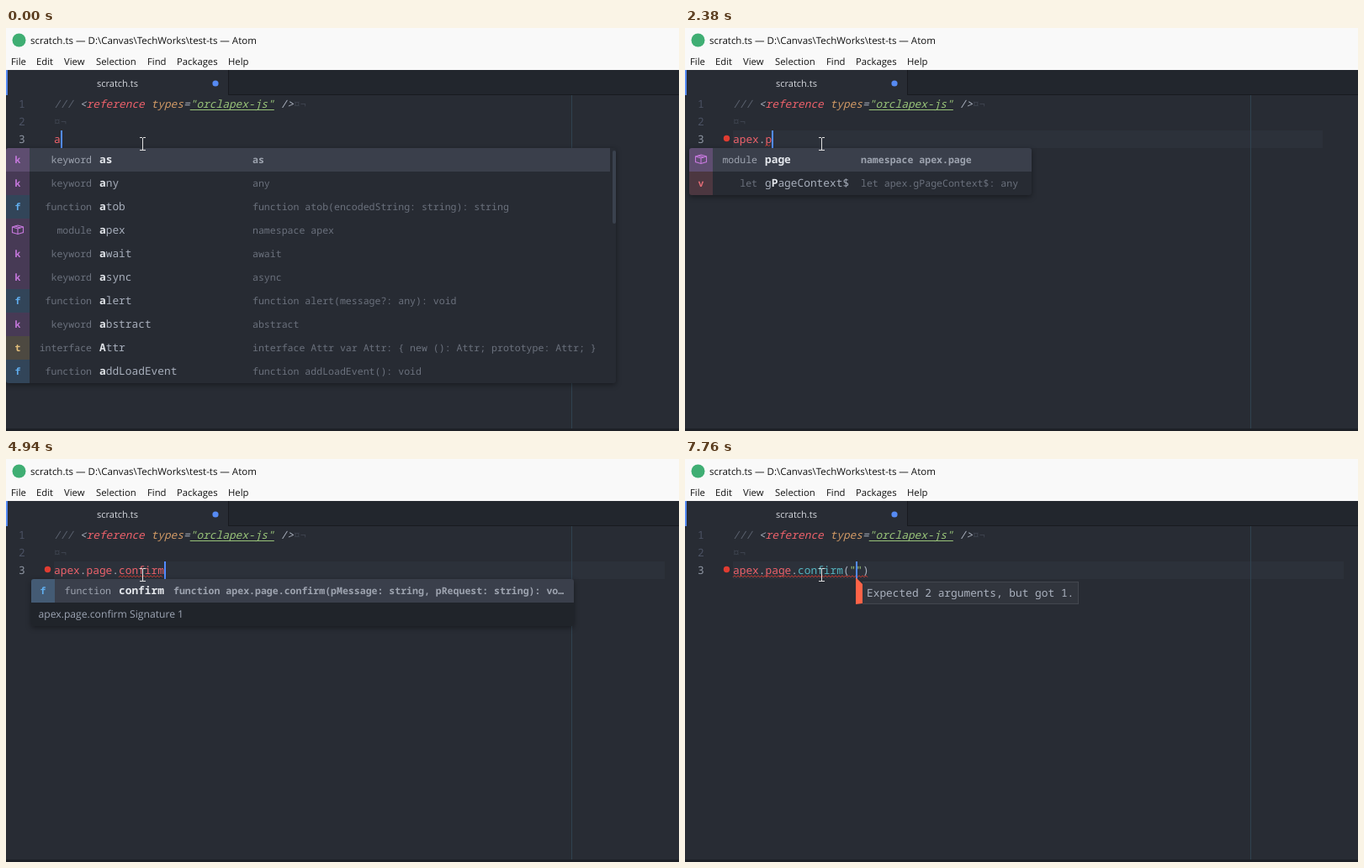
An HTML page with a canvas for the animation above (8 s loop, 800 by 480 pixels).

```html
<!DOCTYPE html>
<html lang="en">
<head>
<meta charset="utf-8">
<title>Editor completion</title>
<style>
html, body { margin: 0; width: 100%; height: 100%; overflow: hidden; background: #282c34; }
canvas { display: block; }
</style>
</head>
<body>
<canvas id="stage" width="800" height="480"></canvas>
<script>
const ctx = document.getElementById('stage').getContext('2d');
ctx.textRendering = 'geometricPrecision';

const LOOP = 8000, CHAR = 7.7, LEFT = 57, ROW = 28, TOP = 143;
const MONO = '"Noto Sans Mono", "DejaVu Sans Mono", monospace';
const UI = '"Open Sans", "Noto Sans", sans-serif';
const CODE = 12.83, SMALL = 11.55;
const RED = '#ee626b', GREY = '#abb2bf', DIM = '#6b717d', GREEN = '#98c379',
      BLUE = '#568af2', CYAN = '#56b6c2', ORANGE = '#d19a66', FAINT = '#3f4550';

const kinds = {
  keyword: { glyph: 'k', color: '#c678dd' },
  function: { glyph: 'f', color: '#61afef' },
  module: { glyph: 'box', color: '#c678dd' },
  interface: { glyph: 't', color: '#e5c07b' },
  let: { glyph: 'v', color: '#e06c75' },
  '': { glyph: 'arrow', color: '#98c379' }
};

// Suggestion rows
const item = (type, name, detail = name) => ({ type, name, detail });
const keyword = name => item('keyword', name);
const space = (name, scope = '') => item('module', name, `namespace ${scope}${name}`);
const variable = (name, type) => item('let', name, `let apex.${name}: ${type}`);
const method = (scope, name, params = '', result = 'void') =>
  item('function', name, `function ${scope}${name}(${params}): ${result}`);
const member = (...names) => names.map(name => space(name, 'apex.'));

const message = 'pMessage: string';
const request = `${message}, pRequest: string`;
const context = variable('gPageContext$', 'any');
const pageConfirm = method('apex.page.', 'confirm', request);
const isChanged = method('apex.page.', 'isChanged', '', 'boolean');
const warnUnsaved = method('apex.page.', 'warnOnUnsavedChanges', `${message}, pExtraIsChanged: any`);
const confirmDoc = 'apex.page.confirm Signature 1';

const popups = {
  a: { left: 0, right: 725, rowRight: 718, nameX: 111, detailX: 293, thumb: 87, rows: [
    keyword('as'), keyword('any'),
    method('', 'atob', 'encodedString: string', 'string'),
    space('apex'), keyword('await'), keyword('async'),
    method('', 'alert', 'message?: any'), keyword('abstract'),
    item('interface', 'Attr', 'interface Attr var Attr: { new (): Attr; prototype: Attr; }'),
    method('', 'addLoadEvent')] },
  apex: { left: 0, right: 260, nameX: 90, detailX: 136, rows: [space('apex')] },
  members: { left: 0, right: 702, rowRight: 692, nameX: 104, detailX: 216, thumb: 169, rows: [
    variable('JQuery', 'JQuery<HTMLElement>'),
    method('apex.', 'confirm', request, 'void (+1 overload)'),
    ...member('da', 'debug', 'event'), context,
    item('function', 'item', 'namespace apex.item function apex.item(pNd: string | HTMLElement): item'),
    ...member('lang', 'message', 'navigation')] },
  page: { left: 5, right: 412, nameX: 95, detailX: 209, rows: [space('page', 'apex.'), context] },
  pageMembers: { left: 31, right: 776, nameX: 134, detailX: 346, limit: 60, rows: [
    method('apex.page.', 'cancelWarnOnUnsavedChanges'), pageConfirm, isChanged,
    method('apex.page.', 'submit', 'pOptions: string'),
    method('apex.page.', 'validate', '', 'boolean'), warnUnsaved] },
  c: { left: 31, right: 776, nameX: 134, detailX: 300, doc: confirmDoc,
    rows: [pageConfirm, isChanged, warnUnsaved, item('', 'combak')] },
  confirm: { left: 30, right: 675, nameX: 134, detailX: 199, doc: confirmDoc, rows: [pageConfirm] }
};

// Each step changes part of the state; wavy is the column where the error underline starts.
const typing = (start, pause, before, word) =>
  [...word].map((_, i) => [start + i * pause, { text: before + word.slice(0, i + 1) }]);

const steps = [
  [0, { text: 'a', caret: true, popup: 'a', dot: false, wavy: -1, tip: null, lineEnd: LEFT }],
  [120, { text: 'ap', lineEnd: 758 }],
  [260, { popup: 'apex' }],
  ...typing(540, 275, 'ap', 'ex'),
  [1090, { text: 'apex.', popup: null }],
  [1240, { popup: 'members' }],
  [1520, { caret: false }],
  [1790, { caret: true }],
  [2220, { text: 'apex.p' }],
  [2380, { popup: 'page', dot: true, wavy: 5 }],
  ...typing(2530, 140, 'apex.p', 'age'),
  [3000, { text: 'apex.page.', popup: null, wavy: -1 }],
  [3230, { popup: 'pageMembers', lineEnd: 783 }],
  [3360, { dot: false }],
  [3500, { caret: false }],
  [3660, { caret: true }],
  [3970, { popup: 'c', dot: true, wavy: 10 }],
  ...typing(3970, 140, 'apex.page.', 'confirm'),
  [4250, { popup: 'confirm' }],
  [5190, { popup: null }],
  [5320, { text: 'apex.page.confirm()' }],
  [5450, { dot: false, wavy: -1 }],
  [5730, { caret: false }],
  [6010, { dot: true, wavy: 0, tip: { col: 18, got: 0 } }],
  [6150, { caret: true }],
  [6580, { caret: false }],
  [6860, { text: 'apex.page.confirm("")', caret: true }],
  [7020, { tip: { col: 19, got: 0 } }],
  [7320, { caret: false }],
  [7630, { caret: true }],
  [7760, { tip: { col: 19, got: 1 } }]
];

const stateAt = t => Object.assign({}, ...steps.filter(([start]) => start <= t).map(([, change]) => change));
const columnX = col => LEFT + col * CHAR;
const shorten = (text, limit) => text.length > limit ? text.slice(0, limit) + '…' : text;

function rect(x, y, w, h, color) {
  ctx.fillStyle = color;
  ctx.fillRect(x, y, w, h);
}

function roundRect(x, y, w, h, r, color) {
  ctx.fillStyle = color;
  ctx.beginPath();
  ctx.roundRect(x, y, w, h, r);
  ctx.fill();
}

function disc(x, y, r, color) {
  ctx.fillStyle = color;
  ctx.beginPath();
  ctx.arc(x, y, r, 0, 7);
  ctx.fill();
}

function polygon(points, color) {
  ctx.fillStyle = color;
  ctx.beginPath();
  points.forEach(([x, y]) => ctx.lineTo(x, y));
  ctx.fill();
}

function polyline(points, color, width = 1) {
  ctx.strokeStyle = color;
  ctx.lineWidth = width;
  ctx.beginPath();
  points.forEach(([x, y]) => ctx.lineTo(x, y));
  ctx.stroke();
}

function label(text, x, y, color, size, family = MONO, style = '', align = 'left') {
  ctx.font = `${style} ${size}px ${family}`;
  ctx.textAlign = align;
  ctx.fillStyle = color;
  ctx.fillText(text, x, y);
}

const code = (text, col, y, color, style) => label(text, columnX(col), y, color, CODE, MONO, style);

function drawWindow() {
  rect(0, 0, 800, 50, '#f9f9f9');
  disc(15.5, 14.5, 8, '#3fae73');
  label('scratch.ts — D:\\Canvas\\TechWorks\\test-ts — Atom', 29, 19, '#111', 11.5, UI);
  const menu = { File: 6, Edit: 36, View: 69, Selection: 107, Find: 168, Packages: 203, Help: 264 };
  for (const name in menu) label(name, menu[name], 44, '#111', 11.3, UI);

  rect(0, 50, 800, 430, '#282c34');
  rect(265, 50, 535, 30, '#22262d');
  rect(264, 50, 1, 30, '#181a1f');
  rect(264, 79, 536, 1, '#181a1f');
  rect(0, 50, 2, 30, BLUE);
  label('scratch.ts', 132.5, 70, '#d7dae0', 11, UI, '', 'center');
  disc(249, 66, 3.6, BLUE);
}

function drawFixedLines() {
  for (let n = 1; n <= 3; n++) label(n, 15, 74 + 21 * n, n < 3 ? '#4b5263' : '#8f96a3', CODE);
  code('///', 0, 95, '#5c6370', 'italic');
  code('<', 4, 95, GREY, 'italic');
  code('reference', 5, 95, RED, 'italic');
  code('types', 15, 95, ORANGE, 'italic');
  code('=', 20, 95, GREY, 'italic');
  code('"orclapex-js"', 21, 95, GREEN, 'italic');
  code('/>', 35, 95, GREY, 'italic');
  rect(columnX(21), 97, 13 * CHAR, 1, GREEN);
  code('¤¬', 37, 95, FAINT);
  code('¤¬', 0, 116, FAINT);
}

function drawTypedLine({ text, wavy, dot, caret }) {
  for (const match of text.matchAll(/\w+|"+|./g)) {
    const [token] = match, next = text[match.index + token.length];
    const color = token[0] === '"' ? GREEN : !/\w/.test(token) ? GREY : next === '(' ? CYAN : RED;
    code(token, match.index, 137, color);
  }
  if (dot) disc(49.5, 131.5, 3.7, '#e03c31');
  if (wavy >= 0) {
    const wave = [];
    for (let x = columnX(wavy); x <= columnX(text.length); x += 2) wave.push([x, wave.length % 2 ? 138.8 : 140.8]);
    polyline(wave, '#d23a31');
  }
  if (text.endsWith('()')) rect(columnX(17), 141, 2 * CHAR, 1, BLUE);
  if (caret) {
    const closing = text.search(/"?\)$/);
    rect(Math.round(columnX(closing < 0 ? text.length : closing) - .1), 122, 2, 21, '#528bff');
  }
}

function drawIcon({ glyph, color }, x, y, selected) {
  ctx.globalAlpha = selected ? .25 : .2;
  rect(x, y, ROW, ROW, color);
  ctx.globalAlpha = 1;
  const midX = x + 14, midY = y + 13;
  if (glyph === 'box') {
    const l = midX - 6.5, r = midX + 6.5, top = midY - 3, low = midY + 3.5;
    polyline([[l, top], [midX, top - 2], [r, top], [r, low], [midX, low + 2], [l, low], [l, top],
      [midX, top + 2], [r, top]], color, 1.1);
    polyline([[midX, top + 2], [midX, low + 2]], color, 1.1);
    polyline([[midX - 3.5, top - 1], [midX + 3, top + 1]], color, 1.1);
  } else if (glyph === 'arrow') {
    rect(x + 7, midY - .5, 6, 3, color);
    polygon([[x + 12, midY - 4], [x + 18, midY + 1], [x + 12, midY + 6]], color);
    rect(x + 19, midY - 4, 2, 10, color);
  } else {
    label(glyph, midX, y + 17.5, color, 11.5, MONO, 'bold', 'center');
  }
}

function drawName(name, x, y, prefix, selected) {
  const start = name.toLowerCase().indexOf(prefix);
  [...name].forEach((char, i) => {
    const bright = selected || (start >= 0 && i >= start && i < start + prefix.length);
    label(char, x + i * CHAR, y, bright ? '#e4e7ec' : '#a8afbc', CODE, MONO, bright ? 'bold' : '');
  });
}

function drawPopup(popup, prefix) {
  const { left, right, rowRight = right, nameX, detailX, thumb, rows, doc, limit = 66 } = popup;
  const width = right - left, height = ROW * (rows.length + (doc ? 1 : 0));
  ctx.save();
  ctx.shadowColor = 'rgba(0,0,0,.4)';
  ctx.shadowBlur = 6;
  ctx.shadowOffsetY = 2;
  roundRect(left, TOP, width, height, 3, '#272b33');
  ctx.restore();

  ctx.save();
  ctx.clip();
  rows.forEach(({ type, name, detail }, i) => {
    const y = TOP + i * ROW, selected = i === 0;
    const color = selected ? '#9da3af' : DIM;
    if (selected) rect(left, y, rowRight - left, ROW, '#3a3f4b');
    drawIcon(kinds[type], left, y, selected);
    label(type, nameX - 9, y + 18, color, SMALL, MONO, '', 'right');
    drawName(name, nameX, y + 18, prefix, selected);
    label(shorten(detail, limit), detailX, y + 18, color, SMALL, MONO, selected ? 'bold' : '');
  });
  if (doc) {
    const y = TOP + rows.length * ROW;
    rect(left, y, width, ROW, '#20242a');
    label(doc, left + 8.5, y + 18, '#9da5b4', 12.16, UI);
  }
  if (thumb) roundRect(rowRight + 3, 146, 4, thumb, 2, '#3a424e');
  ctx.restore();
}

function drawTip({ col, got }) {
  const x = Math.round(columnX(col));
  rect(x + 8, 146, 257, 27, '#43474f');
  rect(x + 8, 147, 256, 25, '#31353d');
  polygon([[x, 141], [x + 8, 149], [x + 8, 172], [x, 173]], '#ff6347');
  label(`Expected 2 arguments, but got ${got}.`, x + 13, 164, GREY, CODE);
}

function drawPointer() {
  rect(162, 131, 1, 15, '#e0e0e0');
  for (const y of [130, 145]) {
    rect(159, y, 3, 1, '#e0e0e0');
    rect(163, y, 3, 1, '#e0e0e0');
  }
}

function draw() {
  const state = stateAt(performance.now() % LOOP);
  drawWindow();
  rect(LEFT, 122, state.lineEnd - LEFT, 21, '#2c313a');
  rect(672, 80, 1, 397, '#304250');
  drawFixedLines();
  drawTypedLine(state);
  if (state.popup) drawPopup(popups[state.popup], state.text.split('.').pop());
  if (state.tip) drawTip(state.tip);
  rect(0, 477, 800, 3, '#1d2026');
  drawPointer();
  requestAnimationFrame(draw);
}
draw();
</script>
</body>
</html>
```
